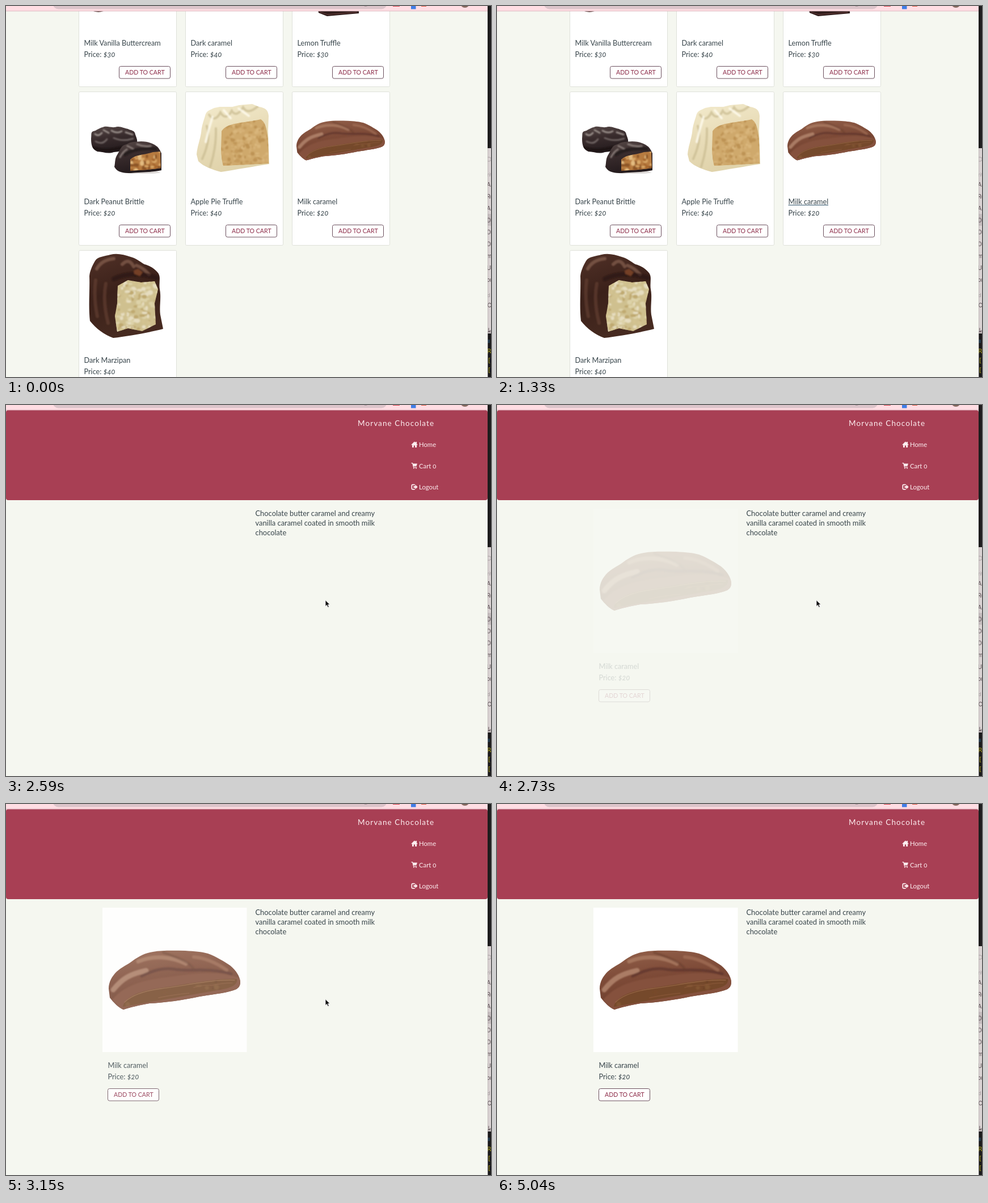
An HTML page for the animation above (5.74 s loop, 855 by 655 pixels).

```html
<!DOCTYPE html>
<html lang="en">
<head>
<meta charset="utf-8">
<title>Chocolate shop</title>
<style>
  html, body { margin: 0; width: 100%; height: 100%; overflow: hidden; background: #f5f7f0; }
  svg { display: block; }
  text { font: 12.7px Lato, "Open Sans", sans-serif; fill: #38454b; font-variant-numeric: oldstyle-nums; white-space: pre; }
  .btn { font-size: 10.6px; fill: #8d2c49; }
  .nav { font-size: 11.3px; fill: #fdeef0; }
  .brand { font-size: 13.5px; letter-spacing: 1.1px; fill: #fdeef0; }
  .desc { font-size: 12.9px; }
  .loading { font-size: 11.2px; fill: #86284a; }
  .side text { font: 10px Inter, sans-serif; fill: #55494d; }
  .side .head { font-size: 9px; fill: #a39a9c; }
  .side .term { font: 11px "DejaVu Sans Mono", monospace; fill: #a8a01c; }
</style>
</head>
<body>
<svg id="stage" width="855" height="655" viewBox="0 0 855 655"></svg>
<script>
const LOOP = 5740, STEP = 70;
const HOVER = 1330, LOAD = 1820, CURSOR_ON = 2310, SHOW = 2590, CURSOR_OFF = 3220, FADE = 1000;

function rng(seed) {
  return () => (seed = (seed * 16807) % 2147483647) / 2147483647;
}

// Scatter crumbs over a box; the caller clips them to a shape.
function crumbs(seed, n, x, y, w, h, colors, size) {
  const r = rng(seed);
  let out = '';
  for (let i = 0; i < n; i++) {
    const rx = size * (.4 + r()), ry = size * (.4 + r() * .8);
    out += `<ellipse cx="${(x + r() * w).toFixed(1)}" cy="${(y + r() * h).toFixed(1)}" rx="${rx.toFixed(1)}" ry="${ry.toFixed(1)}" fill="${colors[Math.floor(r() * colors.length)]}"/>`;
  }
  return out;
}

const path = (d, fill, extra = '') => `<path d="${d}" fill="${fill}" ${extra}/>`;
const line = (d, color, width, opacity = 1) =>
  `<path d="${d}" fill="none" stroke="${color}" stroke-width="${width}" stroke-linecap="round" opacity="${opacity}"/>`;
const rect = (x, y, w, h, fill, extra = '') =>
  `<rect x="${x}" y="${y}" width="${w}" height="${h}" fill="${fill}" ${extra}/>`;
const label = (x, y, str, cls = '') => `<text x="${x}" y="${y}" class="${cls}">${str}</text>`;
const gradient = (id, ...colors) => `<linearGradient id="${id}" x1="0" y1="0" x2=".3" y2="1">` +
  colors.map((c, i) => `<stop offset="${i / (colors.length - 1)}" stop-color="${c}"/>`).join('') + '</linearGradient>';
const blur = (id, r) => `<filter id="${id}"><feGaussianBlur stdDeviation="${r}"/></filter>`;

// A shape with blurred shading kept inside its outline.
function shaded(id, d, fill, marks, filter = 'soft') {
  return `<clipPath id="${id}"><path d="${d}"/></clipPath>` + path(d, fill) +
    `<g clip-path="url(#${id})"><g filter="url(#${filter})">${marks}</g></g>`;
}

function caramel() {
  const body = 'M0 68 C0 56 6 46 14 38 C24 29 33 26 42 19 C53 11 64 5 78 3 C95 0 115 1 135 1 C152 2 164 3 175 6 C191 12 203 20 214 27 C225 36 231 46 232 56 C232 62 230 66 225 69 C212 75 190 77 160 82 C132 88 98 93 72 94 C54 97 38 101 26 105 C18 102 8 92 2 84 Z';
  const cut = 'M25 100 C28 84 50 73 84 68 C128 62 190 49 226 51 C228 61 216 67 196 70 C150 78 88 89 25 100 Z';
  return shaded('bar', body, 'url(#milk)',
      path('M6 88 C26 64 56 53 100 48 C146 42 198 33 236 52 V80 L26 110 Z', '#85513c') +
      line('M8 70 C24 50 38 42 66 36', '#b98c74', 9, .75) +
      line('M52 20 C80 8 112 12 136 24', '#b08067', 7, .7) +
      line('M150 12 C172 14 192 24 208 35', '#a8765d', 6, .6) +
      line('M58 46 C78 36 96 30 118 34 C146 38 176 30 216 42', '#5b3428', 5, .65) +
      line('M96 4 C130 16 146 24 150 34', '#673d2e', 4, .5)) +
    shaded('fudge', cut, '#75492b', crumbs(41, 45, 25, 52, 205, 48, ['#6a4126', '#815432', '#77492c'], 4)) +
    line('M28 92 C40 80 62 72 92 68 C140 62 184 51 222 53', '#a2704f', 1.3, .7) +
    line('M150 66 q18 -5 32 -4 q20 -4 36 -4 M88 84 q30 -6 54 -8', '#936040', 1.4, .5);
}

function brittle() {
  const back = 'M150 234 C151 226 149 223 154 221 C160 220 164 215 171 214 C177 211 184 215 192 214 C201 211 207 216 215 217 C220 220 227 219 228 227 C230 233 233 238 230 243 C225 248 216 246 211 252 C203 257 198 257 190 258 C179 262 171 257 161 257 C153 253 150 248 150 234 Z';
  const front = 'M191 284 C193 276 191 270 197 261 C202 252 203 246 213 244 C220 239 229 240 238 239 C247 239 254 241 262 245 C270 250 271 254 274 260 L274 290 C257 294 237 293 220 295 C208 295 196 294 191 284 Z';
  const cut = 'M219 271 C228 262 244 263 259 258 L272 257 L273 286 C252 290 235 289 219 291 Z';
  return '<ellipse cx="240" cy="294" rx="32" ry="2" fill="#d9d5d3"/>' +
    shaded('rear', back, 'url(#dark)',
      line('M157 226 q6 5 12 -2 M172 219 l9 5 M186 220 q10 6 18 1 M211 223 l12 4', '#aaa09c', 3, .8) +
      line('M158 239 q12 7 20 -4 M190 233 q16 7 34 1', '#8d817e', 3, .65) +
      line('M153 250 Q176 258 204 250', '#1c1415', 5, .8)) +
    shaded('fore', front, 'url(#dark)',
      line('M201 267 q5 -10 12 -14 M214 247 l10 5 M231 244 q12 5 24 3', '#a0948f', 3, .7) +
      line('M210 262 Q228 250 264 252', '#241a1b', 6, .8)) +
    shaded('nuts', cut, '#b77b40', crumbs(5, 45, 218, 256, 56, 38, ['#d9a766', '#8c5425', '#e3bb80', '#a8682f'], 4));
}

function applePie() {
  const body = 'M336 262 C337 248 342 237 344 224 C345 211 348 204 351 194 C353 184 360 184 367 180 L377 178 L387 178 L399 178 L411 175 L434 173 L446 178 C458 180 462 184 463 194 L462 220 L464 279 C438 283 405 289 379 293 C364 289 349 284 339 274 Z';
  const cut = 'M380 221 C390 205 420 207 449 200 C460 207 463 226 463 278 C440 279 412 281 383 282 C377 262 380 240 380 221 Z';
  return shaded('block', body, 'url(#cream)',
      line('M358 192 q10 15 20 -4 q10 16 20 -3 q8 13 20 -6 q8 14 26 -2 M354 212 Q362 234 346 270 M370 216 Q371 250 360 284', '#c9bb91', 4, .7) +
      line('M364 196 Q357 218 352 240 M384 184 L396 198 M410 181 L428 194', '#fffdf0', 4, .8)) +
    shaded('pie', cut, '#cfa96c', crumbs(17, 200, 378, 198, 88, 88, ['#d9b67c', '#c59b5d', '#d5b076', '#bd9354'], 3));
}

function marzipan() {
  const body = 'M147 477 C148 467 152 459 157 450 C162 442 174 442 184 439 C196 436 208 439 220 443 C231 446 237 452 244 456 C252 458 261 463 267 470 C274 477 269 488 271 500 C274 515 270 530 272 545 L277 570 C250 577 215 583 189 586 C174 581 158 569 148 556 C145 530 148 500 147 477 Z';
  const cut = 'M197 494 L215 484 L238 488 L262 486 L268 500 L262 525 L264 562 L240 574 L215 569 L196 575 L192 548 L196 525 Z';
  return shaded('cube', body, 'url(#cocoa)',
      line('M160 464 Q169 448 190 446 M205 456 q12 -12 20 4 M230 458 q12 4 22 16', '#8a6553', 6, .65) +
      line('M158 484 Q154 515 161 548 M176 490 Q170 520 180 560', '#6f4838', 6, .5) +
      line('M190 482 Q222 466 266 480', '#25130f', 8, .6) +
      path('M225 467 l8 -3 l8 6 l-5 7 l-10 -4 z', '#754028')) +
    shaded('almond', cut, '#cfc08f', crumbs(29, 190, 190, 482, 80, 95, ['#ddd2a8', '#d3c391', '#bfa970', '#e6ddc0'], 3.8));
}

function button(x, y) {
  return rect(x + .5, y + .5, 90, 21.5, '#fff', 'rx="3" stroke="#5c3d4c" stroke-width=".9"') + label(x + 11, y + 15, 'ADD TO CART', 'btn');
}

function info(x, y, name, price) {
  return label(x, y, name) + label(x, y + 20.3, `Price: <tspan font-style="italic">$${price}</tspan>`);
}

function card(col, row, name, price, art = '') {
  const x = 128 + col * 188, y = -129 + row * 280;
  return rect(x + .5, y + .5, 172, 271, '#fff', 'rx="2" stroke="#dfe1da"') + art +
    info(x + 9.5, y + 198.7, name, price) + button(x + 71, y + 235);
}

function home() {
  return card(0, 0, 'Milk Vanilla Buttercream', 30, path('M151 8 Q162 13 172 9 V4 H151 Z', '#4b302b')) +
    card(1, 0, 'Dark caramel', 40) +
    card(2, 0, 'Lemon Truffle', 30, path('M550 6 L551 12 L566 18 L622 13 V6 Z', '#2f1b1a') + line('M554 11 L567 15 L618 11', '#5a3633', 1.3)) +
    card(0, 1, 'Dark Peanut Brittle', 20, brittle()) +
    card(1, 1, 'Apple Pie Truffle', 40, applePie()) +
    card(2, 1, 'Milk caramel', 20, '<use href="#caramel" transform="translate(512 202) scale(.672)"/>') +
    card(0, 2, 'Dark Marzipan', 40, marzipan()) +
    '<path id="underline" d="M513.5 351.5 H584" stroke="#2d5168"/>';
}

function navbar() {
  const white = '#fdeef0';
  return rect(0, 9, 849, 159, '#a83f54', 'rx="4"') +
    label(620, 37, 'Morvane Chocolate', 'brand') +
    label(728, 74, 'Home', 'nav') + label(728, 111.5, 'Cart 0', 'nav') + label(728, 149, 'Logout', 'nav') +
    path('M714 70.5 L720 64.5 L722 66.5 V65 H724 V68.5 L726 70.5 H724 V75 H721.2 V71.5 H718.8 V75 H716 V70.5 Z', white) +
    path('M714.5 102 H717 L717.6 103.5 H725 L723.5 108 H718.7 L719 109.2 H724 V110.3 H718 L716.2 103.2 H714.5 Z', white) +
    `<circle cx="719" cy="111.5" r="1.1" fill="${white}"/><circle cx="723" cy="111.5" r="1.1" fill="${white}"/>` +
    line('M720 140.7 H717 Q715.3 140.7 715.3 142.4 V147 Q715.3 148.8 717 148.8 H720', white, 1.7) +
    path('M718.5 143.3 H721.5 V140.6 L725.6 144.7 L721.5 148.8 V146.2 H718.5 Z', white);
}

function detail() {
  return label(439.5, 195.5, 'Chocolate butter caramel and creamy', 'desc') +
    label(439.5, 212.8, 'vanilla caramel coated in smooth milk', 'desc') +
    label(439.5, 230.1, 'chocolate', 'desc') +
    '<g id="product">' + rect(170, 183, 254.5, 255, '#fff') +
    '<use href="#caramel" transform="translate(181 258)"/>' +
    info(179.5, 466, 'Milk caramel', 20) + button(179, 502) + '</g>';
}

function browserBar() {
  return rect(0, 0, 849, 9, '#ffdde3') + rect(0, 8.4, 849, 1, '#dcb9c0') +
    rect(83, -16, 588, 21.5, '#dcc4ca', 'rx="9"') +
    '<circle cx="634" cy="-3" r="4" fill="#a8959c"/><circle cx="809" cy="-5" r="8" fill="#85695f"/>' +
    rect(682, -8, 12, 9, '#d9414b') + rect(714, -4, 8.5, 9.5, '#3f7ee8') + rect(732, -8, 9, 9, '#e2553d');
}

function sidebar() {
  const rows = ['Ai', 'Re', 'Ap', 'De', 'De', 'Do', 'm', 'U', 'or'];
  return '<svg class="side" x="849" y="0" width="6" height="655" viewBox="849 0 6 655">' +
    rect(849, 0, 6, 251, '#1d1c1d') + rect(849, 251, 6, 327, '#d9d2d2') + rect(849, 367, 6, 21, '#c4bcbd') +
    rect(846, 267, 9, 7, 'none', 'rx="3" stroke="#aaa2a3"') +
    label(848, 300.5, 'rit', 'head') + label(848, 514, 'd', 'head') +
    rows.map((s, i) => label(847.5, 318.5 + i * 21, s)).join('') +
    label(848.5, 532, 'C') + label(848, 576, 'ط') +
    rect(849, 578, 6, 77, '#1b1a1b') + rect(849, 589, 4, 6, '#22394a') +
    label(848.5, 612.5, 'R', 'term') + label(848.5, 629, '[]', 'term') + label(848.5, 646, '[]', 'term') +
    rect(848.5, 251, 1, 404, '#a59fa0') + '</svg>';
}

document.getElementById('stage').innerHTML =
  '<defs>' + blur('soft', 1.3) +
  gradient('milk', '#93614b', '#7d4a37', '#6b3e2d') + gradient('dark', '#584a48', '#382b2c', '#241b1d') +
  gradient('cream', '#f3ebcd', '#e9ddb9', '#e0d3ab') + gradient('cocoa', '#513127', '#3b211a', '#462a20') +
  `<g id="caramel">${caramel()}</g></defs>` +
  rect(0, 0, 855, 655, '#f5f7f0') +
  `<g id="home">${home()}</g>` +
  `<g id="shop">${navbar()}<g id="loading">${label(0, 195, 'Loading...', 'loading')}</g><g id="detail">${detail()}</g></g>` +
  browserBar() + sidebar() +
  path('M563 344.5 V355.5 L565.6 353.2 L567.4 357.3 L569.4 356.4 L567.6 352.5 H571 Z', '#111', 'id="cursor" stroke="#fff" stroke-width=".8"');

const el = id => document.getElementById(id);
const show = (id, on) => el(id).setAttribute('visibility', on ? 'inherit' : 'hidden');

// CSS "ease": cubic-bezier(.25, .1, .25, 1)
function ease(p) {
  if (p <= 0) return 0;
  if (p >= 1) return 1;
  const bez = (u, a, b) => 3 * u * (1 - u) ** 2 * a + 3 * u * u * (1 - u) * b + u ** 3;
  let lo = 0, hi = 1;
  for (let i = 0; i < 24; i++) {
    const mid = (lo + hi) / 2;
    if (bez(mid, .25, .25) < p) lo = mid; else hi = mid;
  }
  return bez(lo, .1, 1);
}

function render(ms) {
  const t = Math.floor((ms % LOOP) / STEP) * STEP;
  show('home', t < LOAD);
  show('underline', t >= HOVER && t < LOAD);
  show('shop', t >= LOAD);
  show('loading', t >= LOAD && t < SHOW);
  show('detail', t >= SHOW);
  show('cursor', t >= CURSOR_ON && t < CURSOR_OFF);
  el('product').setAttribute('opacity', ease((t - SHOW) / FADE).toFixed(3));
}

const start = performance.now();
function tick() {
  render(performance.now() - start);
  requestAnimationFrame(tick);
}
tick();
</script>
</body>
</html>
```
